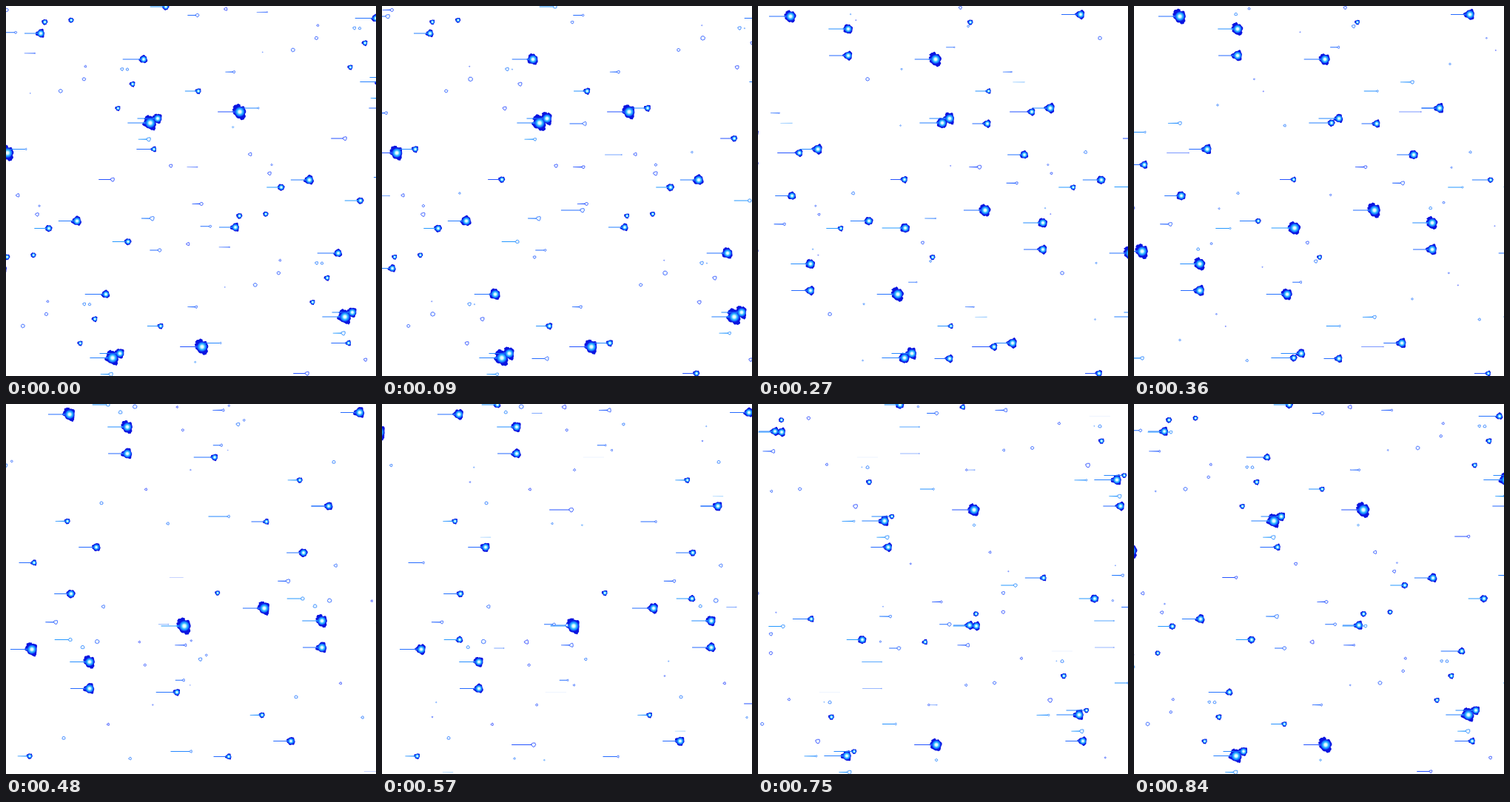
An HTML page with a canvas that plays this animation: 500x500 px, repeating every 870 ms.

```html
<!DOCTYPE html>
<html lang="en">
<head>
<meta charset="utf-8">
<title>Blue comets</title>
<style>
  html, body { margin: 0; width: 100%; height: 100%; overflow: hidden; background: #fff; }
  canvas { display: block; width: 500px; height: 500px; }
</style>
</head>
<body>
<canvas id="stage" width="500" height="500"></canvas>
<script>
const ctx = document.getElementById('stage').getContext('2d');
const LOOP = 870, STEP = 30, SIZE = 500, SPARKS = 40;

// The field repeats on a skewed lattice.
const U = { x: -314, y: 55.5 }, W = { x: 263, y: 262 };

// Time and place at which each comet is brightest, largest comet first.
const peaks = [
  [500, 245, 300], [80, 211, 158], [10, 318, 143], [395, 332, 276],
  [225, 231, 72], [165, 238, 152], [425, 153, 31], [425, 153, 67],
  [110, 432, 235], [300, 401, 138], [640, 468, 138], [390, 384, 201],
  [830, 302, 299], [720, 449, 263], [310, 318, 159], [100, 392, 245],
  [200, 498, 179], [120, 283, 115]
];

let seed = 11;
function rand() {
  seed = (seed * 16807) % 2147483647;
  return seed / 2147483647;
}

// Size sets lifetime, speed (px/ms) and tail length.
function particle(peak, x, y, size, hasTail) {
  return {
    peak, x, y, size,
    life: 380 + 40 * size,
    speed: Math.min(0.2, 0.06 + 0.03 * size),
    tail: hasTail ? 5 + 3 * size : 0,
    hue: 212 + 22 * rand(),
    turn: 2 * Math.PI * rand()
  };
}

const comets = peaks.map(([t, x, y], i) => particle(t, x, y, 8.8 - 0.26 * i, true));
const sparks = Array.from({ length: SPARKS }, () => {
  const a = rand(), b = rand();
  return particle(LOOP * rand(), a * U.x + b * W.x, a * U.y + b * W.y, 2 + 1.8 * rand() ** 2, rand() < 0.35);
});
const particles = [...comets, ...sparks];

function visible(t) {
  const out = [];
  for (const p of particles) {
    for (let k = -1; k <= 1; k++) {
      const age = t - p.peak + k * LOOP;
      if (Math.abs(age) >= p.life / 2) continue;
      const glow = Math.cos(Math.PI * age / p.life);
      const r = p.size * glow ** 0.6;
      for (let i = -3; i <= 3; i++) {
        for (let j = -3; j <= 3; j++) {
          const x = p.x + p.speed * age + i * U.x + j * W.x;
          const y = p.y + i * U.y + j * W.y;
          if (x > -15 && x < SIZE + 40 && y > -15 && y < SIZE + 15) out.push({ p, x, y, r, glow, age });
        }
      }
    }
  }
  return out;
}

// Ragged drop, narrow on the left and flared on the right.
function drop(x, y, r, turn) {
  ctx.beginPath();
  for (let i = 0; i < 36; i++) {
    const a = i * Math.PI / 18, c = Math.cos(a);
    const q = r * (1 + 0.1 * Math.sin(3 * a + turn) + 0.07 * Math.sin(7 * a - 2 * turn));
    ctx.lineTo(x + q * c * (c < 0 ? 1.2 : 0.9), y + q * Math.sin(a) * (1 + 0.22 * c));
  }
  ctx.closePath();
}

function drawTail({ x, y, r, p }) {
  const flare = r < 3.2 ? 0.5 : r * 0.4, start = x - p.tail, neck = x - r * 1.3;
  ctx.globalAlpha = Math.min(1, r / 1.5);
  ctx.fillStyle = `hsl(${p.hue - 4} 100% 57%)`;
  ctx.beginPath();
  ctx.moveTo(start, y - 0.45);
  ctx.lineTo(neck, y - 0.6);
  ctx.lineTo(x, y - flare);
  ctx.lineTo(x, y + flare);
  ctx.lineTo(neck, y + 0.6);
  ctx.lineTo(start, y + 0.45);
  ctx.fill();
  ctx.globalAlpha = 1;
}

function drawRing({ x, y, r, p }) {
  drop(x, y, Math.max(0.5, r - 0.5), p.turn);
  ctx.fillStyle = '#eef8ff';
  ctx.fill();
  ctx.strokeStyle = `hsl(${p.hue} 100% 58%)`;
  ctx.globalAlpha = Math.min(1, r / 2);
  ctx.stroke();
  ctx.globalAlpha = 1;
}

function drawEdge({ x, y, r, p, glow, age }) {
  const turn = p.turn + age / 150;
  ctx.fillStyle = '#0a14e0';
  drop(x, y, r, turn);
  ctx.fill();
  if (p.size < 7) return;
  // The largest heads swell into side lobes.
  const lobe = 0.55 * r * glow * glow;
  for (const side of [-1, 1]) {
    drop(x + side * r * 0.4, y + side * r * 0.75, lobe, turn * side);
    ctx.fill();
  }
}

function drawCore({ x, y, r }) {
  const q = r * 0.92, g = ctx.createRadialGradient(x, y, 0, x, y, q);
  g.addColorStop(0, '#fff');
  g.addColorStop(0.25, '#d0f6ff');
  g.addColorStop(0.5, '#34bcff');
  g.addColorStop(0.75, '#1468ff');
  g.addColorStop(1, 'rgba(10, 20, 224, 0)');
  ctx.fillStyle = g;
  ctx.beginPath();
  ctx.arc(x, y, q, 0, 2 * Math.PI);
  ctx.fill();
}

function draw(t) {
  ctx.fillStyle = '#fff';
  ctx.fillRect(0, 0, SIZE, SIZE);
  const all = visible(t), big = all.filter(s => s.r >= 3.2);
  big.forEach(drawEdge);
  all.filter(s => s.p.tail).forEach(drawTail);
  all.filter(s => s.r < 3.2 && s.r > 0.7).forEach(drawRing);
  big.forEach(drawCore);
}

let last = -1;
const start = performance.now();
function tick() {
  const t = Math.floor((performance.now() - start) % LOOP / STEP) * STEP;
  if (t !== last) draw(last = t);
  requestAnimationFrame(tick);
}
tick();
</script>
</body>
</html>
```
